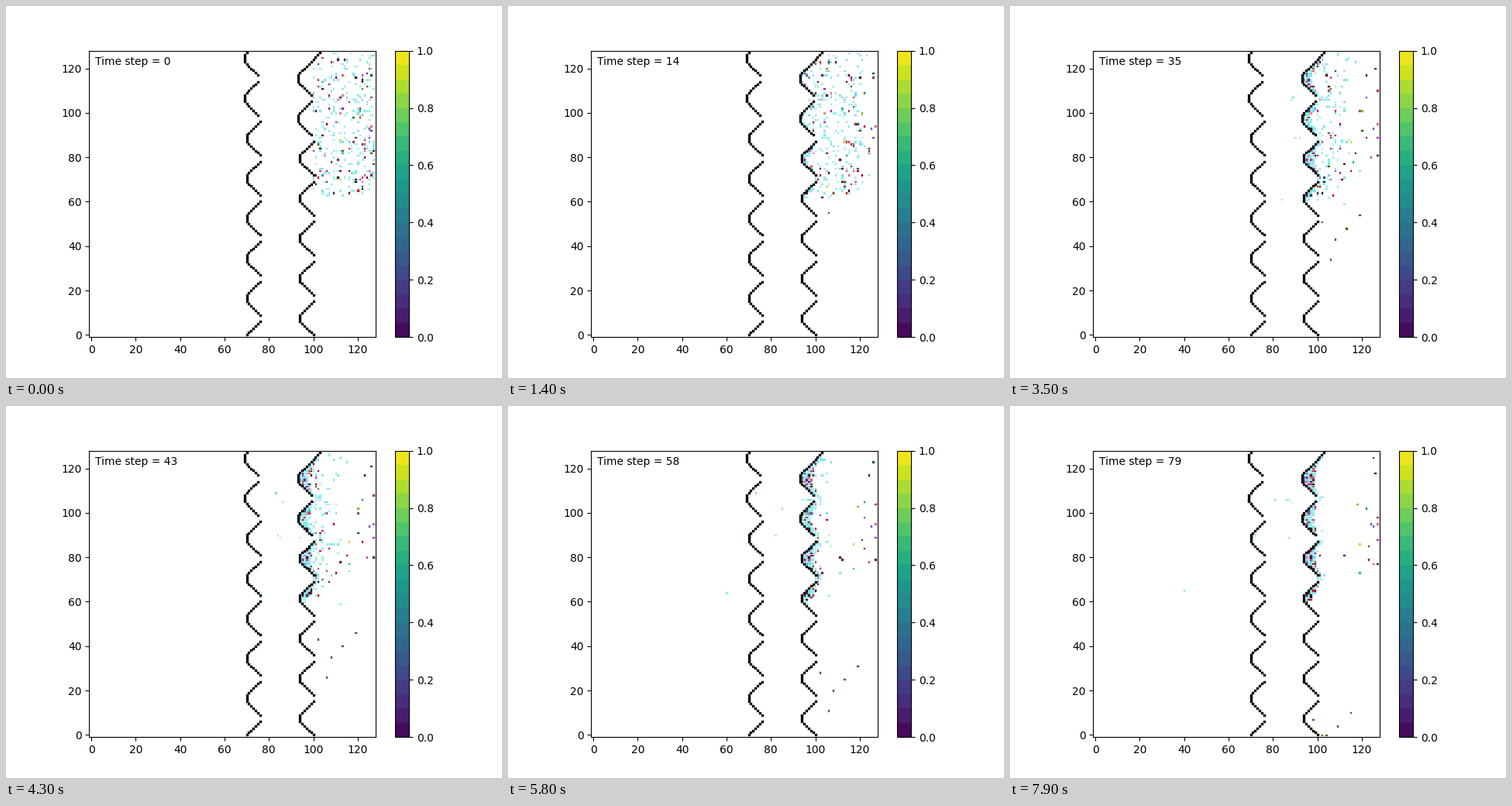
A matplotlib script that plays this animation: 640 by 480 pixels, repeating every 8 s.

```python
from colorsys import hsv_to_rgb

import numpy as np
import matplotlib.pyplot as plt
from matplotlib.animation import FuncAnimation
from matplotlib.cm import ScalarMappable
from matplotlib.colors import ListedColormap

STEPS, SIZE, PERIOD = 80, 128, 18
N_PALE, N_MIXED, N_LEAK, N_LONERS = 205, 70, 14, 16
rng = np.random.default_rng(14)
rows = np.arange(SIZE)
steps = np.arange(STEPS)


def build_wall(first, base):
    """Column of the scalloped wall in each row; -1 marks a gap."""
    centers = np.arange(first, SIZE, PERIOD)
    cols = np.full(SIZE, -1)
    for y in rows:
        c = min(centers, key=lambda v: abs(v - y))
        d = abs(y - c)
        if d <= 7.5 or y > centers[-1]:
            cols[y] = base + max(0, d - 1.5) - (c > 90)
    return cols


left, right = build_wall(-1.5, 70), build_wall(7.5, 94)
gaps = rows[(right < 0) & (rows > 63)]
left_stop = np.where(left < 0, 76, left)
right_stop = np.where(right < 0, 100, right)


def pale():
    return hsv_to_rgb(rng.uniform(0.47, 0.55), rng.uniform(0.3, 0.5), rng.uniform(0.92, 0.97))


def vivid():
    hue = rng.uniform(0.82, 1) if rng.random() < 0.6 else rng.random()
    return hsv_to_rgb(hue, rng.uniform(0.4, 1), rng.uniform(0.2, 0.95))


class Drifter:
    """Walks left at random until a wall holds it, sliding into the hollows."""

    def __init__(self, used, mixed=False, leaky=False):
        self.leaky = leaky
        self.color = vivid() if mixed else pale()
        self.speed = rng.uniform(0.45, 0.9) if leaky else rng.uniform(0.36, 0.58)
        self.lift = rng.uniform(-0.1, 0.25) if mixed else 0
        self.cell = self.start()
        while self.cell in used or self.cell[0] <= right[self.cell[1]]:
            self.cell = self.start()
        used.add(self.cell)

    def start(self):
        y = rng.choice(gaps) if self.leaky else rng.integers(63, SIZE)
        return int(rng.integers(100, SIZE)), int(y)

    def is_open(self, x, y):
        stop = left_stop if self.leaky else right_stop
        return 0 <= y < SIZE and x > stop[y]

    def step(self, taken):
        x, y = self.cell
        in_lane = self.leaky and x >= 92
        side = 1 if rng.random() < 0.5 + self.lift else -1
        moves = []
        if rng.random() < self.speed:
            moves = [(-1, 0)] if in_lane else [(-1, 0), (-1, side), (-1, -side)]
        elif not in_lane and rng.random() < 0.3:
            moves = [(0, side)]
        for dx, dy in moves:
            new = x + dx, y + dy
            if self.is_open(*new) and (new not in taken or rng.random() < 0.01):
                taken.discard(self.cell)
                taken.add(new)
                self.cell = new
                break


def simulate(crowd):
    path = []
    for _ in steps:
        path.append([p.cell for p in crowd])
        taken = set(path[-1])
        for p in sorted(crowd, key=lambda p: p.cell[0]):
            p.step(taken)
    return np.array(path)


def add_single(x, y, color):
    singles.append(np.column_stack([np.round(x), np.round(np.clip(y, 0, SIZE - 1))]))
    colors.append(color)


used = set()
crowd = [Drifter(used) for _ in range(N_PALE)]
crowd += [Drifter(used, mixed=True) for _ in range(N_MIXED)]
crowd += [Drifter(used, leaky=True) for _ in range(N_LEAK)]
colors = [p.color for p in crowd]
path = simulate(crowd)
singles = []

# Heavy brown ones fall a cell per step, then edge towards the wall
for x0, y0 in [(102, 86), (106, 69), (108, 78), (113, 83), (119, 89)]:
    add_single(x0 - 0.2 * np.maximum(0, steps - 58), y0 - steps,
               hsv_to_rgb(rng.uniform(0.08, 0.16), 0.65, 0.42))

# Slow ones hang about on the right
for _ in range(N_LONERS):
    x = rng.uniform(110, 127) + rng.uniform(-0.05, 0.15) * steps
    add_single(np.minimum(x, SIZE - 1), rng.uniform(72, 127) + rng.uniform(-0.3, 0.15) * steps, vivid())

# One slips through both walls
x = 118.5 - steps
add_single(x, np.interp(x, [39, 61, 84, 97], [65, 64, 61, 70]), pale())

path = np.concatenate([path, np.stack(singles, axis=1)], axis=1)

fig, ax = plt.subplots(figsize=(6.4, 4.8), dpi=100)
ax.set_aspect("equal")
ax.set(xlim=(-1, SIZE), ylim=(-1, SIZE), xticks=range(0, 121, 20), yticks=range(0, 121, 20))
bands = ListedColormap(plt.get_cmap("viridis")((np.arange(20) + 0.5) / 20))
fig.colorbar(ScalarMappable(cmap=bands), ax=ax)

for wall in (left, right):
    solid = wall >= 0
    ax.scatter(wall[solid], rows[solid], s=1, c="black", marker="s", zorder=2)
dots = ax.scatter(*path[0].T, s=1, c=colors, marker="s", zorder=1.5)
label = ax.text(0.02, 0.95, "", transform=ax.transAxes)


def update(t):
    dots.set_offsets(path[t])
    label.set_text(f"Time step = {t}")
    return dots, label


anim = FuncAnimation(fig, update, frames=STEPS, interval=100, repeat=True, repeat_delay=0)
plt.show()
```
